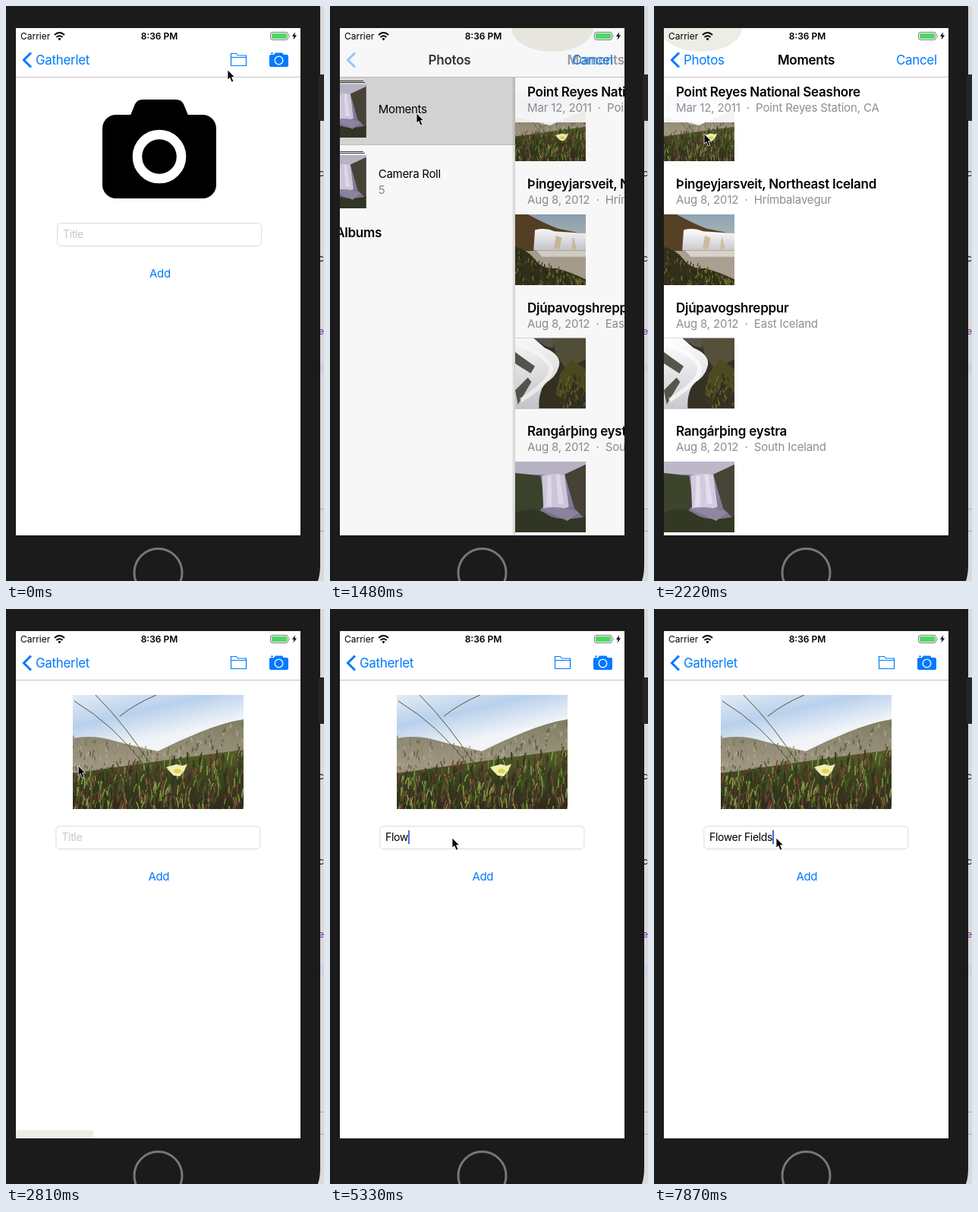
An HTML page that plays this animation: 419x756 px, repeating every 8 s.

```html
<!DOCTYPE html>
<html lang="en">
<head>
<meta charset="utf-8">
<title>Photo picker</title>
<style>
  html, body { margin: 0; width: 100%; height: 100%; overflow: hidden; background: #1b1b1b; }
  svg { display: block; }
  text { font: 15px Inter, "Open Sans", sans-serif; letter-spacing: -.02em; }
  .nav { font-size: 17px; }
  .bold { font-size: 17px; font-weight: 600; letter-spacing: -.015em; }
  .mid { text-anchor: middle; }
  .grey { fill: #8e8e93; letter-spacing: -.01em; }
  .blue { fill: #007aff; }
  .field { font-size: 14px; letter-spacing: -.025em; }
  .status { font-size: 12px; letter-spacing: 0; }
  .line { fill: none; stroke: #c4c4c7; }
  .back { fill: none; stroke: #007aff; stroke-width: 3; }
  .chevron { fill: none; stroke: #c7c7cc; stroke-width: 2; }
  .tufts { fill: none; stroke-width: 1.6; }
</style>
</head>
<body>
<svg width="419" height="756" viewBox="0 0 419 756">
  <defs>
    <clipPath id="screen"><rect x="13" y="29" width="375" height="667"/></clipPath>
    <linearGradient id="sky" x2=".35" y2="1">
      <stop stop-color="#e3ecf5"/><stop offset=".25" stop-color="#b9d0ec"/><stop offset=".5" stop-color="#f1f5f8"/>
    </linearGradient>
    <linearGradient id="dune" x2="0" y2="1">
      <stop stop-color="#7d7d62"/><stop offset=".5" stop-color="#a19683"/><stop offset="1" stop-color="#767052"/>
    </linearGradient>
    <linearGradient id="grass" x2="0" y2="1">
      <stop stop-color="#566029"/><stop offset=".5" stop-color="#3c4020"/><stop offset="1" stop-color="#30291d"/>
    </linearGradient>
    <linearGradient id="dusk" x2="0" y2="1">
      <stop stop-color="#8ea3b5"/><stop offset="1" stop-color="#e6d3b2"/>
    </linearGradient>
    <linearGradient id="water" x2="0" y2="1">
      <stop stop-color="#fff"/><stop offset="1" stop-color="#c9c8ce"/>
    </linearGradient>
    <linearGradient id="mist" x2="0" y2="1">
      <stop stop-color="#9a90b3"/><stop offset="1" stop-color="#756c85"/>
    </linearGradient>
    <linearGradient id="edge">
      <stop stop-color="#000" stop-opacity="0"/><stop offset="1" stop-color="#000" stop-opacity=".17"/>
    </linearGradient>
    <symbol id="flower" viewBox="0 0 225 150" preserveAspectRatio="xMidYMid slice">
      <rect width="225" height="150" fill="url(#sky)"/>
      <path d="M0 57Q25 52 50 59T112 74Q140 60 170 48T225 32V150H0Z" fill="url(#dune)"/>
      <g id="scrub" class="tufts"></g>
      <path d="M0 103Q50 96 85 91T150 82Q195 76 225 72V150H0Z" fill="url(#grass)"/>
      <g id="blades" class="tufts"></g>
      <path d="M2 8Q55 40 94 92M30 0Q70 40 104 94M110 0Q82 12 62 28M0 148Q60 112 92 96" fill="none" stroke="#4f5736"/>
      <path d="M123 95l7-2 7-2 7 2 7-2-4 8-6 8-8-1-5-5Z" fill="#f1edb5"/>
      <ellipse cx="138" cy="100" rx="5" ry="3" fill="#e4d14c"/>
    </symbol>
    <symbol id="lake" viewBox="0 0 100 100">
      <rect width="100" height="100" fill="url(#dusk)"/>
      <path d="M0 0H18Q40 12 60 20L100 28V52H0Z" fill="#564125"/>
      <path d="M28 22Q42 18 56 24L100 27V51H26Z" fill="url(#water)"/>
      <path d="M58 30l8 3-3 16h-8ZM82 31l5 18h-7Z" fill="#cdbb9c"/>
      <path d="M0 52H100V100H0Z" fill="#aaa092"/>
      <path d="M30 51H100V60H38Z" fill="#d8d2c8"/>
      <path d="M0 46Q18 50 28 64T58 76Q80 82 100 92V100H0Z" fill="#32301a"/>
      <g id="moss" class="tufts"></g>
    </symbol>
    <symbol id="rapids" viewBox="0 0 100 100">
      <rect width="100" height="100" fill="#353224"/>
      <path d="M52 0H100V30L72 44 58 24Z" fill="#545039"/>
      <path d="M64 50l16-20 20 14v34L84 62 70 88 58 80Z" fill="#4d4a22"/>
      <path d="M0 0H26L42 14Q66 24 62 40T42 64Q32 80 34 100H0Z" fill="url(#water)"/>
      <path d="M26 0l18 12 10 2V0ZM0 20l28 20-6 10L0 36ZM0 74l18-18 5 6L4 94Z" fill="#56564d"/>
      <path d="M0 8Q34 18 48 36T8 88" fill="none" stroke="#fff" stroke-width="6" opacity=".7"/>
      <g id="ledge" class="tufts"></g>
    </symbol>
    <symbol id="gorge" viewBox="0 0 100 100">
      <rect width="100" height="100" fill="url(#mist)"/>
      <path d="M0 0H100V14L70 20 30 18 0 26Z" fill="#bdb8c8"/>
      <path d="M0 16L36 20 42 60 26 82 0 88Z" fill="#3d442c"/>
      <path d="M70 18L100 4V82L84 66Z" fill="#484437"/>
      <path d="M38 20Q54 15 70 19L76 64Q58 72 40 66Z" fill="#d2cbe0"/>
      <path d="M46 20h5l1 44h-8ZM58 18h5l6 42h-8Z" fill="#e4deee"/>
      <path d="M0 72Q28 62 44 74T100 78V100H0Z" fill="#323824"/>
      <path d="M36 67Q62 60 90 72L74 84Q50 72 36 67Z" fill="#8f87a2"/>
    </symbol>
    <g id="stack">
      <path d="M26 98.500H87M24 100.500H89" stroke="#333b31"/>
      <use href="#gorge" x="21" y="103" width="70" height="70"/>
    </g>
    <path id="chevron" class="chevron" d="M366 132l6 6-6 6"/>
    <path id="back" class="back" d="M33 61.500L23.500 71 33 80.500"/>
  </defs>

  <!-- device and the window behind it -->
  <rect x="410" width="9" height="756" fill="#dadada"/>
  <path d="M414 468h5v16h-5Z" fill="#d2d2e0"/>
  <path d="M414 661.500h5M414 690.500h5" stroke="#aaa"/>
  <g style="font-weight:600"><text class="status" x="412" y="224">c</text><text class="status" x="412" y="336">c</text><text class="status" x="412" y="432" fill="#5c2699">e</text></g>
  <path d="M0 0H414V735Q414 747 411 756H0Z" fill="#1b1b1b"/>
  <rect x="412" y="90" width="9" height="61" rx="3" fill="#262626"/>
  <circle cx="200.500" cy="745" r="31.500" fill="none" stroke="#777" stroke-width="3"/>

  <g clip-path="url(#screen)">
    <rect x="13" y="29" width="375" height="667" fill="#fff"/>
    <g id="form">
      <path class="line" d="M13 93.500H388"/>
      <use href="#back"/>
      <text class="nav blue" x="39" y="77">Gatherlet</text>
      <path d="M296.500 78.500V62.500h7l2 2.500h11v13.500ZM296.500 67.500h20" fill="none" stroke="#007aff" stroke-width="1.200"/>
      <path d="M349 64h4l2-2.500h9L366 64h4q2 0 2 2v12q0 2-2 2h-21q-2 0-2-2V66q0-2 2-2ZM349 61.500h3v1.500h-3Z" class="blue"/>
      <circle cx="359.500" cy="71.500" r="5.300" class="blue" stroke="#fff" stroke-width="1.300"/>
      <g id="bigCamera">
        <rect x="127" y="143" width="150" height="110" rx="18"/>
        <path d="M163 146L170 129Q173 123 180 123H224Q231 123 234 129L241 146Z"/>
        <circle cx="202" cy="198" r="29" stroke="#fff" stroke-width="12.500"/>
      </g>
      <use id="picked" href="#flower" x="88" y="113" width="225" height="150"/>
      <g id="inputs">
        <rect class="line" x="67.500" y="285.500" width="269" height="30" rx="5" style="stroke:#dcdcde"/>
        <text id="hint" class="field" x="75" y="305" fill="#c7c7cc">Title</text>
        <text class="blue" x="189" y="357">Add</text>
      </g>
      <text id="typed" class="field" x="73" y="305"></text>
      <rect id="caret" y="291" width="2" height="18" fill="#4169d9"/>
    </g>

    <g id="picker" clip-path="url(#screen)">
      <rect x="13" y="29" width="375" height="667" fill="#fff"/>
      <g id="albums">
        <rect id="pressed" x="13" y="93" width="375" height="90" fill="#d9d9d9"/>
        <use href="#stack"/><use href="#stack" y="93"/>
        <path class="line" d="M13 182.500H388"/>
        <text x="107" y="141">Moments</text>
        <text x="107" y="226">Camera Roll</text>
        <text x="107" y="247" class="grey">5</text>
        <text x="21" y="304" class="bold">My Albums</text>
        <use href="#chevron"/><use href="#chevron" y="93"/>
      </g>
      <g id="moments">
        <rect x="8" y="93" width="5" height="603" fill="url(#edge)"/>
        <rect x="13" y="93" width="375" height="603" fill="#fff"/>
        <g id="sections"></g>
      </g>
      <rect x="13" y="29" width="375" height="64" fill="#fff"/>
      <ellipse id="glow" cx="62" cy="29" rx="54" ry="31" fill="#eeede5"/>
      <path class="line" d="M13 93.500H388"/>
      <rect id="dim" x="13" y="29" width="375" height="667"/>
      <text id="albumsTitle" class="bold mid" y="77">Photos</text>
      <text id="momentsTitle" class="bold mid" y="77">Moments</text>
      <g id="backButton"><use href="#back"/><text id="backLabel" class="nav blue" x="39" y="77">Photos</text></g>
      <text class="nav blue" x="319" y="77">Cancel</text>
    </g>

    <text class="status" x="19" y="44">Carrier</text>
    <g fill="none" stroke="#000" stroke-width="2"><path d="M64 38q6.500-6 13 0M66.500 41q4-3.500 8 0"/></g>
    <path d="M68.500 43q2-2 4 0l-2 2.500Z"/>
    <text class="status mid" x="202" y="44" style="font-weight:600">8:36 PM</text>
    <rect x="348.500" y="34.500" width="23" height="10" rx="2.500" fill="none" stroke="#777"/>
    <rect x="350" y="36" width="20" height="7" rx="1" fill="#4cd964"/>
    <path d="M373 38q2 1.500 0 3Z" fill="#777"/>
    <path d="M381 34.500l-4 5.500h2.500l-1 4.500 4.500-6h-2.500Z"/>
  </g>
  <g id="pointer"><path d="M0 0V13L3 10.500 5.200 16 7.800 15 5.500 9.600H9.500Z" stroke="#fff" stroke-width=".8"/></g>
</svg>

<script>
const LOOP = 8000, STEPS = 54;
const el = id => document.getElementById(id);
const set = (id, attrs) => { for (const key in attrs) el(id).setAttribute(key, attrs[key]); };
const move = (id, x, y) => set(id, { transform: `translate(${x} ${y})` });

let seed = 7;
const random = () => (seed = seed * 16807 % 2147483647) / 2147483647;

// Scatter short strokes back to front between topAt(x) and bottom
function addTufts(id, count, [left, right], topAt, bottom, length, colors) {
  el(id).innerHTML = Array.from({ length: count }, (_, i) => {
    const x = left + random() * (right - left), top = topAt(x);
    const y = top + (i / count) * (bottom - top) + length * .7;
    const lean = (random() - .4) * length * .7, rise = length * (.6 + random() * .7);
    const color = colors[Math.floor(random() * colors.length)];
    return `<path d="M${x.toFixed(1)} ${y.toFixed(1)}q${(lean * .1).toFixed(1)}-${(rise / 2).toFixed(1)} ${lean.toFixed(1)}-${rise.toFixed(1)}" stroke="${color}"/>`;
  }).join('');
}
const ridge = x => x < 112 ? 54 + (x / 112) ** 2 * 20 : 74 - (x - 112) * .37;
addTufts('scrub', 260, [0, 225], ridge, 96, 5, ['#6c6f4c', '#8c8a68', '#b3a795', '#9c917e', '#5d6142']);
addTufts('blades', 520, [0, 225], x => 101 - x * .13, 152, 12,
  ['#66822f', '#829c45', '#465c25', '#5c3329', '#7a4539', '#2b311a', '#343b1e']);
addTufts('moss', 130, [0, 100], x => 48 + x * .46, 100, 5, ['#5d5c25', '#767330', '#45411f', '#282614']);
addTufts('ledge', 70, [60, 100], x => 88 - x * .42, 96, 6, ['#5e5924', '#2a2719', '#43401f', '#706a2e']);

const sections = [
  ['flower', 111, 119, 'Point Reyes National Seashore', 'Mar 12, 2011', 'Point Reyes Station, CA'],
  ['lake', 274, 240, 'Þingeyjarsveit, Northeast Iceland', 'Aug 8, 2012', 'Hrímbalavegur'],
  ['rapids', 436.5, 402.5, 'Djúpavogshreppur', 'Aug 8, 2012', 'East Iceland'],
  ['gorge', 599, 565, 'Rangárþing eystra', 'Aug 8, 2012', 'South Iceland'],
];
el('sections').innerHTML = sections.map(([photo, top, base, title, date, place], i) => `
  <use href="#${photo}" x="13" y="${top}" width="93" height="93"/>
  ${i ? '' : '<rect x="13" y="93" width="375" height="60" fill="#fff" opacity=".9"/>'}
  <text class="bold" x="29" y="${base}">${title}</text>
  <text class="grey" x="29" y="${base + 20}">${date}&nbsp;&nbsp;·&nbsp;&nbsp;${place}</text>`).join('');

// [step, x, y]
const pointerPath = [
  [0, 292, 84], [2, 306, 69], [3, 306, 70], [5, 304, 101], [8, 114, 141], [10, 114, 141],
  [15, 66, 168], [17, 66, 168], [24, 168, 301], [26, 168, 301], [28, 161, 301], [STEPS, 161, 301],
];
// [step, text]
const typing = [
  [0, ''], [33, 'F'], [35, 'Fl'], [36, 'Flow'], [37, 'Flower'], [38, 'Flower '], [40, 'Flower F'],
  [42, 'Flower Fi'], [43, 'Flower Fie'], [44, 'Flower Fied'], [45, 'Flower Fieds'], [48, 'Flower Fied'],
  [49, 'Flower Fie'], [51, 'Flower Fiel'], [52, 'Flower Field'], [53, 'Flower Fields'],
];

// Remaining distance of a critically damped spring
function spring(t, start) {
  const x = Math.max(0, t - start) * .01826;
  const rest = (1 + x) * Math.exp(-x);
  return rest < .002 ? 0 : rest;
}

function pointerAt(step) {
  const i = pointerPath.findIndex(p => p[0] > step);
  const [s0, x0, y0] = pointerPath[i - 1], [s1, x1, y1] = pointerPath[i];
  const f = (step - s0) / (s1 - s0);
  return [x0 + (x1 - x0) * f, y0 + (y1 - y0) * f];
}

function caretOpacity(step) {
  if (step < 28 || step === 31 || step === 32) return 0;
  return step === 30 ? .5 : 1;
}

function render(step) {
  const t = step * LOOP / STEPS;
  const dismissed = 1 - spring(t, 2480);
  move('picker', 0, 667 * (dismissed || spring(t, 520)));

  const rest = spring(t, 1408.6), pushed = 1 - rest;
  move('albums', -112.5 * pushed, 0);
  move('moments', 375 * rest, 0);
  move('glow', 375 * rest, 0);
  set('pressed', { opacity: +(step >= 10) });
  set('dim', { opacity: pushed ? Math.min(.032, rest * .052) : 0 });
  set('albumsTitle', { x: 200.5 - 112 * pushed, opacity: Math.max(0, 1 - pushed ** 2 * 1.5) });
  set('momentsTitle', { x: 200.5 + 243 * rest, opacity: pushed });
  set('backButton', { opacity: pushed });
  set('backLabel', { x: 39 + 112 * rest, opacity: Math.max(0, pushed * 2 - 1) });

  const hasPhoto = step >= 16;
  set('bigCamera', { opacity: +!hasPhoto });
  set('picked', { opacity: +hasPhoto });
  move('inputs', hasPhoto ? -1.6 : 0, 0);

  const text = typing.findLast(entry => entry[0] <= step)[1].replace(/ /g, '\u00a0');
  el('typed').textContent = text;
  set('hint', { opacity: +!text });
  set('caret', { x: text ? 73 + el('typed').getComputedTextLength() : 73, opacity: caretOpacity(step) });
  move('pointer', ...pointerAt(step));
}

let shown = -1;
function tick() {
  // a small lead keeps rounded step times on the right side of each change
  const step = Math.floor((performance.now() + 6) % LOOP * STEPS / LOOP);
  if (step !== shown) render(shown = step);
  requestAnimationFrame(tick);
}
tick();
</script>
</body>
</html>
```
